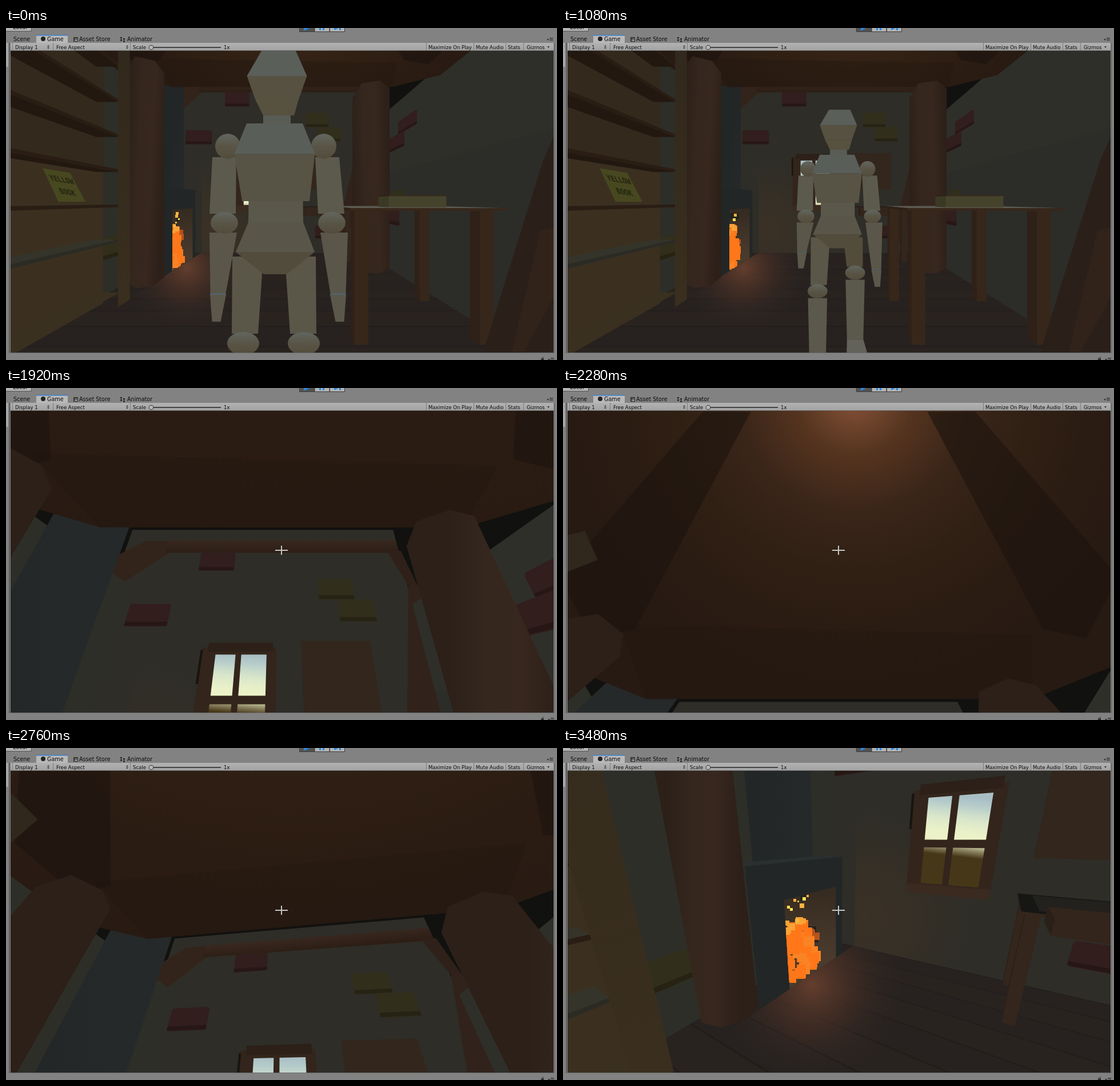
An HTML page with a canvas for the animation above (3600 ms loop, 964 by 581 pixels).

```html
<!DOCTYPE html>
<html lang="en">
<head>
<meta charset="utf-8">
<title>Game view</title>
<style>
html, body { margin: 0; width: 100%; height: 100%; overflow: hidden; background: #828282; }
canvas { display: block; width: 964px; height: 581px; }
</style>
</head>
<body>
<canvas id="stage" width="964" height="581"></canvas>
<script>
const g = document.getElementById('stage').getContext('2d');
const LOOP = 3600, STEP = 120, CUT = 1200;
const CX = 483, CY = 304, FOCAL = 457, RAD = Math.PI / 180, NEAR = 8;
// room planes
const BACK = 457, RIGHT = 250, LEFT = -297, FLOOR = -216, ROOF = 212, STONE = -247, BEHIND = -325;

// ---------- helpers ----------
function rect(color, x, y, w, h) {
  g.fillStyle = color;
  g.fillRect(x, y, w, h);
}
function trace(list) {
  g.beginPath();
  list.forEach(([x, y], i) => i ? g.lineTo(x, y) : g.moveTo(x, y));
  g.closePath();
}
function flat(color, list) {
  trace(list);
  g.fillStyle = color;
  g.fill();
}
function shade(grad, stops) {
  stops.forEach((c, i) => grad.addColorStop(i / (stops.length - 1), c));
  return grad;
}
const ramp = (a, b, ...stops) => shade(g.createLinearGradient(...a, ...b), stops);
function random(seed) {
  return () => {
    seed = (seed * 1664525 + 1013904223) >>> 0;
    return seed / 4294967296;
  };
}

// ---------- camera ----------
const camera = (pos, yaw, pitch, zoom) => ({
  pos, sa: Math.sin(yaw * RAD), ca: Math.cos(yaw * RAD),
  sp: Math.sin(pitch * RAD), cp: Math.cos(pitch * RAD), f: FOCAL * zoom
});
const FAR = camera([0, -60, -331], 0, 0, 1);
// time, yaw, pitch, zoom
const TURN = [
  [1200, 0, 0, 1], [1560, 0, 0, 1], [1920, 0, 28.5, .95],
  [2280, 0, 67.5, .87], [2760, -8.3, 37.4, .92], [3480, -31.6, -17.3, 1]
];
let eye = FAR;

function lookAt(t) {
  const last = TURN.length - 1;
  let i = 0;
  while (i < last - 1 && t >= TURN[i + 1][0]) i++;
  const a = TURN[i], b = TURN[i + 1], span = b[0] - a[0], u = (t - a[0]) / span;
  const slope = (n, k) => {
    const p = TURN[Math.max(0, n - 1)], q = TURN[Math.min(last, n + 1)];
    return (q[k] - p[k]) / (q[0] - p[0]) * span;
  };
  const at = k => {
    const d = b[k] - a[k], m = slope(i, k), n = slope(i + 1, k);
    return a[k] + u * (m + u * (3 * d - 2 * m - n + u * (m + n - 2 * d)));
  };
  return camera([0, 0, 0], at(1), at(2), at(3));
}
function view(p) {
  const [x, y, z] = p.map((c, i) => c - eye.pos[i]);
  const ez = z * eye.ca + x * eye.sa;
  return [x * eye.ca - z * eye.sa, y * eye.cp - ez * eye.sp, ez * eye.cp + y * eye.sp];
}
const screen = ([x, y, z]) => [CX + eye.f * x / z, CY - eye.f * y / z];
function outline(corners) {
  const list = corners.map(view), out = [];
  list.forEach((p, i) => {
    const q = list[(i + 1) % list.length];
    if (p[2] > NEAR) out.push(screen(p));
    if ((p[2] > NEAR) !== (q[2] > NEAR)) {
      const k = (NEAR - p[2]) / (q[2] - p[2]);
      out.push(screen(p.map((c, j) => c + (q[j] - c) * k)));
    }
  });
  return out;
}
function face(fill, corners) {
  const list = outline(corners);
  if (list.length > 2) flat(fill, list);
}
function fade(a, b, ...stops) {
  const p = view(a), q = view(b);
  return p[2] < NEAR || q[2] < NEAR ? stops[0] : ramp(screen(p), screen(q), ...stops);
}
function spot(at, r, ...stops) {
  const p = view(at);
  if (p[2] < 40) return stops[stops.length - 1];
  const [x, y] = screen(p);
  return shade(g.createRadialGradient(x, y, 0, x, y, r * eye.f / p[2]), stops);
}

// ---------- building parts ----------
const onBack = (u, v) => [u, v, BACK];
const onSide = x => (u, v) => [x, v, u];
const onLevel = y => (u, v) => [u, y, v];
const onRight = onSide(RIGHT), onLeft = onSide(LEFT), onStone = onSide(STONE);

const shape = (fill, place, ...uv) => face(fill, uv.map(p => place(...p)));
const corners = (u0, v0, u1, v1) => [[u0, v0], [u1, v0], [u1, v1], [u0, v1]];
const quad = (fill, place, u0, v0, u1, v1) => shape(fill, place, ...corners(u0, v0, u1, v1));

// draws only the sides turned to the eye
function box(fill, x0, y0, z0, x1, y1, z1, topFill) {
  const [ex, ey, ez] = eye.pos;
  const side = (color, dark, place, ...uv) => {
    quad(color, place, ...uv);
    quad(`rgba(0,0,0,${dark})`, place, ...uv);
  };
  if (ey > y1) side(topFill || fill, 0, onLevel(y1), x0, z0, x1, z1);
  if (ey < y0) side(fill, .3, onLevel(y0), x0, z0, x1, z1);
  if (ex < x0) side(fill, .15, onSide(x0), z0, y0, z1, y1);
  if (ex > x1) side(fill, .15, onSide(x1), z0, y0, z1, y1);
  if (ez < z0) side(fill, 0, (u, v) => [u, v, z0], x0, y0, x1, y1);
}
function brick(color, place, u, v, w = 73, h = 43) {
  const cut = 3;
  shape(color, place, [u + cut, v], [u + w - cut, v], [u + w, v - cut], [u + w, v - h + cut],
    [u + w - cut, v - h], [u + cut, v - h], [u, v - h + cut], [u, v - cut]);
  quad('rgba(12,4,0,.28)', place, u, v - h * .8, u + w, v - h + 1);
}
function table(wood, x0, z0, x1, z1, top, leg, topFill) {
  for (const z of [z1 - leg, z0])
    for (const x of [x0 + 4, x1 - leg - 14]) box(wood, x, FLOOR, z, x + leg, top - 3, z + leg);
  box(wood, x0, top - 3, z0, x1, top, z1, topFill);
}
function pillar(x, z, r) {
  const dx = x - eye.pos[0], dz = z - eye.pos[2], d = Math.hypot(dx, dz);
  const at = (a, y) => [x + a * r * dz / d, y, z - a * r * dx / d];
  shape(fade(at(-1, 0), at(1, 0), '#2c2019', '#35271e', '#37271e', '#2c2019'), at,
    [-1, FLOOR + 8], [-1, 180], [-.5, ROOF], [.5, ROOF], [1, 192], [1, FLOOR + 8], [.4, FLOOR - 6], [-.4, FLOOR - 6]);
}

const OAK = '#33251c', RED = '#311e1d', OLIVE = '#312e1b';

function windowFrame() {
  quad(OAK, onBack, -140, 76, -10, -76);
  quad('#2c2019', onBack, -130, 84, -16, 69);
  quad('#3a2a20', onBack, -138, -72, -10, -88);
  quad('#181410', onBack, -143, 72, -139, 18);
  // the sky is far away: its colours follow the height above the horizon
  const far = e => screen(view([eye.pos[0] - 1500, eye.pos[1] + e * 9000, eye.pos[2] + 9000]));
  const sky = ramp(far(.14), far(-.05), '#a9bfc5', '#b5cbca', '#c8dacb', '#d9e6ca', '#e4edc9',
    '#ecf2c8', '#edf3c8', '#938b68', '#453718');
  for (const x of [-116, -71])
    for (const [top, bottom] of [[64, 1], [-11, -70]]) quad(sky, onBack, x, top, x + (x < -99 ? 35 : 44), bottom);
}
function backWall() {
  quad('#2e2d27', onBack, LEFT - 40, FLOOR, RIGHT, 330);
  quad(spot(onBack(-221, -146), 250, '#3b3126', '#342f26', 'rgba(46,45,39,0)'), onBack, -243, FLOOR, RIGHT, 110);
  shape('#33241b', onBack, [-241, 270], [-225, 300], [-300, 300], [-348, 265], [-348, 174]);
  quad(fade(onBack(0, 302), onBack(0, 270), '#38281f', '#2d1e15'), onBack, -250, 302, 250, 270);
  shape('#2f2119', onBack, [225, 275], [255, 275], [270, 192], [252, 192]);
  brick(RED, onBack, -172, 270);
  brick(RED, onBack, -291, 156, 79);
  brick(OLIVE, onBack, 72, 208, 68);
  brick(OLIVE, onBack, 108, 165, 68);
  brick(RED, onBack, 100, -132, 62, 39);
  windowFrame();
  box('#33261d', 35, -23, BACK - 6, 155, 86, BACK);
  shape('#31231b', onBack, [252, 195], [330, 195], [240, -75], [170, -208], [153, -204], [184, -74]);
}
function ground() {
  const floor = onLevel(FLOOR);
  quad('#272220', floor, LEFT, BEHIND, RIGHT, BACK);
  for (let i = 0; i < 13; i++) {
    const z = BACK - i * 46;
    if (i % 2) quad('rgba(60,46,38,.12)', floor, LEFT, z, RIGHT, z - 46);
    quad('#211d1b', floor, LEFT, z, RIGHT, z - 2);
  }
  quad(spot(floor(-225, 285), 150, 'rgba(106,65,47,.9)', 'rgba(80,50,38,.4)', 'rgba(41,36,33,0)'),
    floor, STONE, BEHIND, RIGHT, BACK);
}
function sideWalls() {
  quad('#2d2e28', onLeft, 0, FLOOR, BACK, 190);
  brick(OLIVE, onLeft, 92, -120, 58, 38);
  quad('#2f2f2a', onRight, BEHIND, FLOOR, BACK, 155);
  quad('#2c2c28', onRight, BEHIND, FLOOR, BACK, 8);
  brick(RED, onRight, 153, 112, 79, 28);
  brick(RED, onRight, 203, 86, 83, 32);
  brick(OLIVE, onRight, 205, -35, 60, 36);
  brick(RED, onRight, 226, -72, 74, 40);
}

// ---------- fireplace ----------
function flames(step) {
  const r = random(step * 7919 + 11);
  const bit = (u, v, size, color) => {
    const p = view([-262, FLOOR + v * 135, 250 + u * 102]);
    if (p[2] < NEAR) return;
    const [x, y] = screen(p), w = size * eye.f / p[2];
    rect(color, Math.round(x - w / 2), Math.round(y - w / 2), Math.ceil(w), Math.ceil(w));
  };
  for (let i = 0; i < 10; i++) bit(.1 + r() * .9, r() * 1.05, 8 + r() * 8, '#22231e');
  for (let i = 0; i < 6; i++) bit(.5 + r() * .5, .2 + r() * .4, 11 + r() * 4, '#b5531f');
  for (let i = 0; i < 80; i++) {
    const v = Math.pow(r(), 1.1) * .68;
    bit(r() * (1 - v * .5), v, 12 + r() * 6, i % 7 ? '#ff7719' : '#fa8425');
  }
  for (let i = 0; i < 6; i++) bit(.2 + r() * .5, .6 + r() * .14, 6 + r() * 6, '#f9a337');
  for (let i = 0; i < 12; i++) bit(r() * .8, .7 + r() * .28, 2 + r() * 5, i % 2 ? '#ffdc55' : '#f8b541');
}
function fireplace(step) {
  quad(fade([STONE, 0, 211], [STONE, 0, 326], '#222626', '#252929'), onStone, 211, -28, 326, 300);
  quad('#2a2f2f', onLevel(-28), LEFT, 199, STONE, 412);
  quad('#222626', onStone, 199, FLOOR, 412, -28);
  const hole = corners(258, FLOOR, 390, -78).map(p => onStone(...p));
  face(fade(hole[2], hole[1], '#352a20', '#4a3b2d'), hole);
  const edge = outline(hole);
  if (edge.length < 3) return;
  g.save();
  trace(edge);
  g.clip();
  flames(step);
  g.restore();
}

function ceiling() {
  const top = onLevel(ROOF);
  shape(spot(top(12, -51), 225, '#875338', '#55341f', '#3a2519', '#302014', '#2b1c13', '#271a12'), top,
    [-340, BEHIND], [340, BEHIND], [340, 230], [260, 288], [-260, 288], [-340, 230]);
  for (const s of [-1, 1])
    shape('rgba(30,21,15,.65)', top, [s * 70, -41], [s * 108, -41], [s * 290, 105], [s * 290, 185], [s * 235, 172]);
  shape('rgba(30,21,14,.3)', top, [-250, 165], [225, 180], [260, 288], [-260, 288]);
}

// ---------- shelves and near furniture ----------
function book() {
  const at = onSide(-250);
  const cover = [[-58, -25], [-23, -26], [1, -60], [-39, -60]].map(p => at(...p));
  face('#474820', cover);
  const [a, b, , d] = cover.map(p => screen(view(p)));
  g.save();
  g.transform((b[0] - a[0]) / 100, (b[1] - a[1]) / 100, (d[0] - a[0]) / 100, (d[1] - a[1]) / 100, ...a);
  g.font = 'bold 24px "DejaVu Sans Mono", monospace';
  g.textAlign = 'center';
  g.fillStyle = '#23250f';
  g.fillText('YELLOW', 54, 35);
  g.fillText('BOOK', 54, 72);
  g.restore();
}
function shelves() {
  const front = onSide(-243), inner = onSide(-275);
  quad('#33291c', inner, BEHIND, FLOOR, 70, ROOF);
  quad('#3b3020', inner, BEHIND, FLOOR, 70, -10);
  for (let i = 0; i < 6; i++) {
    const y = -120 + 52 * i;
    box(i < 1 ? '#32332a' : '#312217', -275, y, BEHIND, -243, y + 4, 56, '#34342a');
  }
  quad('#3a301f', onLevel(FLOOR + 20), -275, BEHIND, -243, 60);
  quad(fade(front(70, ROOF), front(70, FLOOR), '#30281c', '#3a2f1e'), front, 56, FLOOR, 86, ROOF);
  if (eye === FAR) book();
}
function nearProps() {
  box('#38291c', 133, -66, -5, 205, -52, 30, '#49472f');
  table('#37271b', 75, -46, 245, 94, -67, 15, '#5d5b52');
  box('#45432c', 133, -67, -5, 205, -53, 30);
  const post = (u, v) => [u, v, -131];
  shape('#2a2019', post, [154, -175], [200, -28], [208, -10], [208, -175]);
  shape('#32231a', post, [176, -175], [198, -82], [208, -80], [208, -133], [185, -175]);
}
function room(step) {
  rect('#11110f', 8, 40, 950, 528);
  backWall();
  ground();
  sideWalls();
  table('#34261c', 25, 338, 188, BACK, -74, 14, '#161614');
  quad('#23211d', onLevel(-74), 42, 350, 172, 450);
  box('#33251b', 55, -97, 340, 157, -78, 400);
  fireplace(step);
  ceiling();
  pillar(201, 262, 40);
  pillar(-260, 165, 33);
  shelves();
  nearProps();
}

// ---------- walker ----------
// a chain of tapered pieces: each joint is x, y, width
function limb(fills, ...joints) {
  fills.forEach((fill, i) => {
    const [x, y, w] = joints[i], [p, q, v] = joints[i + 1];
    flat(fill, [[x - w / 2, y], [x + w / 2, y], [p + v / 2, q], [p - v / 2, q]]);
  });
}
function ball(x, y, rx, ry) {
  g.beginPath();
  g.ellipse(x, y, rx, ry, 0, 0, 7);
  g.fillStyle = ramp([x, y - ry], [x, y + ry], '#636660', '#595546', '#524c3c');
  g.fill();
}
function leg(s, lift) {
  const x = 468 + s * 53, y = 552 - 52 * lift, foot = 760 - 72 * lift;
  limb([lift > .5 ? '#534c3a' : '#5a5749'], [469 + s * 46, 400, 54], [469 + s * 51, y - 17, 46]);
  limb(['#5b594c', '#62625a'], [x, y + 20, 54], [x, foot, 46], [x + 6, foot + 45, 60]);
  ball(x, y, 28, 20);
}
function arm(s, swing) {
  const tip = s * swing * 26, x = 476 + s * 105, wrist = 464 + tip;
  limb(['#5c5a4d'], [472 + s * 90, 226, 42], [474 + s * 95, 325, 46]);
  limb(['#5a574a'], [477 + s * 97, 358, 48], [x, wrist, 27]);
  limb(['#53616a', '#5b584b'], [x, wrist, 27], [x, wrist + 3, 28], [x + s * 3, wrist + 50, 15]);
  ball(472 + s * 84, 207, 22, 22);
  ball(476 + s * 94, 341, 24, 19);
}
function walker(t) {
  const s = 1 / (1 + .613 * t / 1080), swing = Math.sin(t / 1080 * 2.5 * Math.PI);
  g.save();
  g.translate(495, 311);
  g.scale(s, s);
  g.translate(-495, -311);
  for (const side of [-1, 1]) leg(side, Math.max(0, side * swing));
  for (const side of [-1, 1]) arm(side, swing);
  limb(['#5a584b', '#595649', '#524c3c'], [472, 300, 95], [472, 340, 96], [471, 392, 138], [471, 431, 40]);
  limb(['#595e59', '#575345'], [470, 167, 98], [470, 220, 141], [472, 303, 118]);
  limb(['#595c55'], [474, 150, 48], [474, 168, 48]);
  limb(['#5a5f5a', '#575141', '#575140'], [477, 40, 60], [474, 84, 105], [474, 125, 76], [477, 153, 54]);
  g.restore();
}

// ---------- editor frame ----------
function label(text, x, y, size) {
  g.font = size + 'px "DejaVu Sans", sans-serif';
  g.fillStyle = '#0c0c0c';
  g.fillText(text, x, y);
}
function arrow(x, y, w, h) {
  flat('#333', [[x - w, y], [x + w, y], [x, y + h]]);
}
function menuMark(x, y) {
  arrow(x + 2, y, 2, 3);
  for (let i = 0; i < 3; i++) rect('#333', x + 5, y - 2 + i * 2, 6, 1);
}
function dot(color, x, y, r) {
  g.beginPath();
  g.arc(x, y, r, 0, 7);
  g.fillStyle = color;
  g.fill();
}
function topButtons() {
  rect('#555', 0, 0, 45, 6);
  rect('#b4b4b4', 0, 0, 44, 5);
  label('Local', 12, 2, 9.6);
  rect('#3c3c3c', 513, 0, 80, 7);
  for (let i = 0; i < 3; i++) rect(i ? '#b3b3b3' : '#535353', 514 + i * 26.5, 0, 25, 6);
  const blue = '#278bea';
  flat(blue, [[521, 0], [531, 0], [521, 5]]);
  flat(blue, [[574, 0], [582, 0], [574, 4]]);
  for (const x of [548, 554, 583]) rect(blue, x, 0, 3, 4);
}
function tabs() {
  rect('#b9b9b9', 53, 13, 55, 14);
  rect('#3b7dcc', 53, 12, 55, 1.5);
  [['Scene', 13], ['Game', 72], ['Asset Store', 128], ['Animator', 212]]
    .forEach(([text, x]) => label(text, x, 23, 9.6));
  dot('#222', 65, 19, 4);
  rect('#333', 118, 16, 8, 8);
  rect('#8c8c8c', 120, 18, 5, 1);
  rect('#8c8c8c', 120, 20, 5, 3);
  for (let i = 0; i < 4; i++) rect('#222', 200 + (i % 2) * 5, 16 + i * 2, 3, 2.5);
  menuMark(946, 19);
}
function toolbar() {
  rect(ramp([0, 26], [0, 40], '#b2b2b2', '#a2a2a2'), 8, 26, 950, 13);
  rect('#666', 8, 39, 950, 1);
  for (const x of [11, 82, 217, 735, 818, 874, 905]) rect('#7d7d7d', x, 26, 1, 13);
  [['Display 1', 16], ['Free Aspect', 88], ['Scale', 222], ['1x', 381], ['Maximize On Play', 739],
    ['Mute Audio', 822], ['Stats', 878], ['Gizmos', 911]].forEach(([text, x]) => label(text, x, 36.5, 8.55));
  for (const x of [74, 212]) {
    arrow(x, 32.5, 2, -2.5);
    arrow(x, 34, 2, 2.5);
  }
  arrow(949, 32, 2, 3);
  rect('#444', 254, 33, 122, 2);
  dot('#3a3a3a', 254, 34, 4.3);
  dot('#b8b8b8', 254, 34, 3.3);
}
function editor() {
  const grey = '#828282';
  rect(grey, 0, 0, 964, 40);
  rect(grey, 0, 568, 964, 13);
  rect(grey, 0, 40, 8, 528);
  rect(grey, 958, 40, 6, 528);
  rect('#a6a6a6', 0, 26, 4, 42);
  rect('#5d5d5d', 5, 26, 2, 543);
  rect('#5d5d5d', 959, 26, 1, 543);
  rect('#696969', 8, 568, 952, 1);
  topButtons();
  tabs();
  toolbar();
  rect('#333', 936, 578, 5, 3);
  rect('#333', 938, 576, 3, 1);
  menuMark(948, 579);
}

function draw(step) {
  const t = step * STEP, walking = t < CUT;
  eye = walking ? FAR : lookAt(t);
  g.save();
  g.beginPath();
  g.rect(8, 40, 950, 528);
  g.clip();
  room(step);
  if (walking) {
    walker(t);
  } else {
    rect('#c4c5c1', 471, 283, 22, 2);
    rect('#c4c5c1', 481, 276, 2, 16);
  }
  g.restore();
  editor();
}

const start = performance.now();
let shown = -1;
function tick() {
  const step = Math.floor((performance.now() - start) % LOOP / STEP);
  if (step !== shown) draw(shown = step);
  requestAnimationFrame(tick);
}
tick();
</script>
</body>
</html>
```
